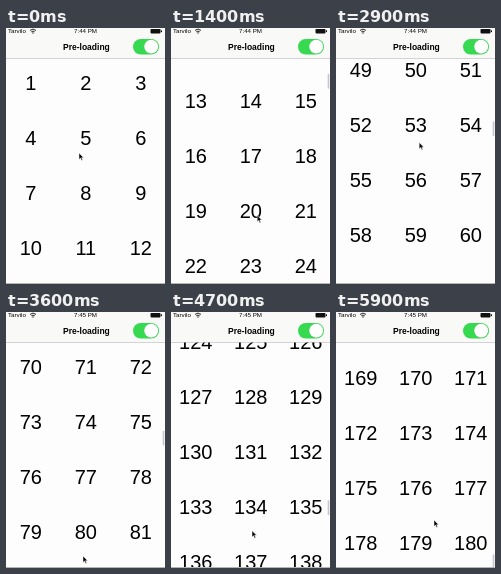
An HTML page for the animation above (6000 ms loop, 159 by 256 pixels).

```html
<!DOCTYPE html>
<html lang="en">
<head>
<meta charset="utf-8">
<title>Pre-loading</title>
<style>
  html, body { margin: 0; width: 100%; height: 100%; overflow: hidden; background: #fdfdfe; }
  svg { display: block; width: 159px; height: 256px; }
  text { font-family: "Liberation Sans", Arial, sans-serif; text-anchor: middle; }
  #cells { font-size: 20px; }
  .status { font-size: 6.2px; }
  .title { font-size: 8.5px; font-weight: bold; }
</style>
</head>
<body>
<svg viewBox="0 0 159 256">
  <rect width="159" height="256" fill="#fdfdfe"/>
  <g id="cells"></g>
  <rect id="bar" x="156.7" width="1.6" height="15" rx=".8" fill="#c6c6d0"/>
  <rect y="255" width="159" height="1" fill="#b4b4b4"/>

  <rect width="159" height="30" fill="#f9f9f8"/>
  <rect y="30" width="159" height=".6" fill="#b8b8bb"/>
  <text class="status" x="2" y="5.3" style="text-anchor:start">Tarvilo</text>
  <g fill="none" stroke="#111" stroke-width=".9">
    <path d="M24 2.4Q27 -.2 30 2.4M25.3 3.8Q27 2.4 28.7 3.8"/>
    <circle cx="27" cy="5" r=".3"/>
  </g>
  <text class="status" id="clock" x="79.5" y="5.3"></text>
  <rect x="144.5" y="1" width="10" height="4.4" rx=".8" fill="#111"/>
  <rect x="155" y="2.3" width="1" height="1.8" fill="#111"/>
  <text class="title" x="80.4" y="22">Pre-loading</text>
  <rect x="127" y="11" width="26" height="15.5" rx="7.75" fill="#37d950"/>
  <circle cx="145.2" cy="18.9" r="7" fill="#aaa" opacity=".35"/>
  <circle cx="145.2" cy="18.6" r="6.9" fill="#fff"/>

  <path id="cursor" d="M0 0V6.4L1.5 5.1L2.6 7.6L3.7 7.1L2.6 4.7H4.6Z" fill="#000" stroke="#fff" stroke-width=".5"/>
</svg>
<script>
const LOOP = 6000, STEP = 100, ROWS = 60, PITCH = 55;
const FIRST_FLICK = 800, FLICK = 970, LIFT = 200, RETURN = 550, TOP = 102;
const $ = id => document.getElementById(id);
const mix = (a, b, u) => a + (b - a) * u;
const ease = (t, from, length) => {
  const u = Math.min(1, Math.max(0, (t - from) / length));
  return u * u * (3 - 2 * u);
};

$("cells").innerHTML = Array.from({ length: ROWS * 3 }, (_, i) =>
  `<text x="${24.8 + i % 3 * PITCH}" y="${62 + Math.floor(i / 3) * PITCH}">${i + 1}</text>`).join("");

// [time, offset] along the scroll
const stops = [[850, 0], [2000, 423], [2900, 893], [3600, 1265], [4700, 2280], [5800, 3069]];

// Where the pointer rests before each flick
const rests = [[88, 226], [86, 224], [84, 222], [77, 244], [81, 222], [98, 208]];

function scrollAt(t) {
  const next = stops.findIndex(([time]) => t < time);
  if (next === 0) return 0;
  if (next < 0) return stops.at(-1)[1];
  const [t0, y0] = stops[next - 1], [t1, y1] = stops[next];
  return mix(y0, y1, (t - t0) / (t1 - t0));
}

function pointerAt(t) {
  if (t < FIRST_FLICK) {
    const u = ease(t, 150, 500);
    return [mix(73, rests[0][0], u), mix(125, rests[0][1], u)];
  }
  const n = Math.floor((t - FIRST_FLICK) / FLICK);
  const [x0, y0] = rests[n], [x1, y1] = rests[n + 1] || rests[n];
  if (n === rests.length - 1) return [x0, y0];
  const phase = (t - FIRST_FLICK) % FLICK;
  const back = ease(phase, LIFT + 50, RETURN);
  return [mix(x0, x1, ease(phase, 0, LIFT + RETURN)),
    mix(mix(y0, TOP, ease(phase, 0, LIFT)), y1, back)];
}

function draw(now) {
  const t = Math.floor(now % LOOP / STEP) * STEP;
  const y = scrollAt(t);
  $("cells").setAttribute("transform", `translate(0 ${-Math.round(y)})`);
  $("bar").setAttribute("y", 32 + y * 0.0685);
  $("bar").setAttribute("opacity", y > 0 ? 1 : 0);
  $("clock").textContent = t < 3300 ? "7:44 PM" : "7:45 PM";
  $("cursor").setAttribute("transform", `translate(${pointerAt(t)})`);
}

const start = performance.now();
function tick() {
  draw(performance.now() - start);
  requestAnimationFrame(tick);
}
tick();
</script>
</body>
</html>
```
